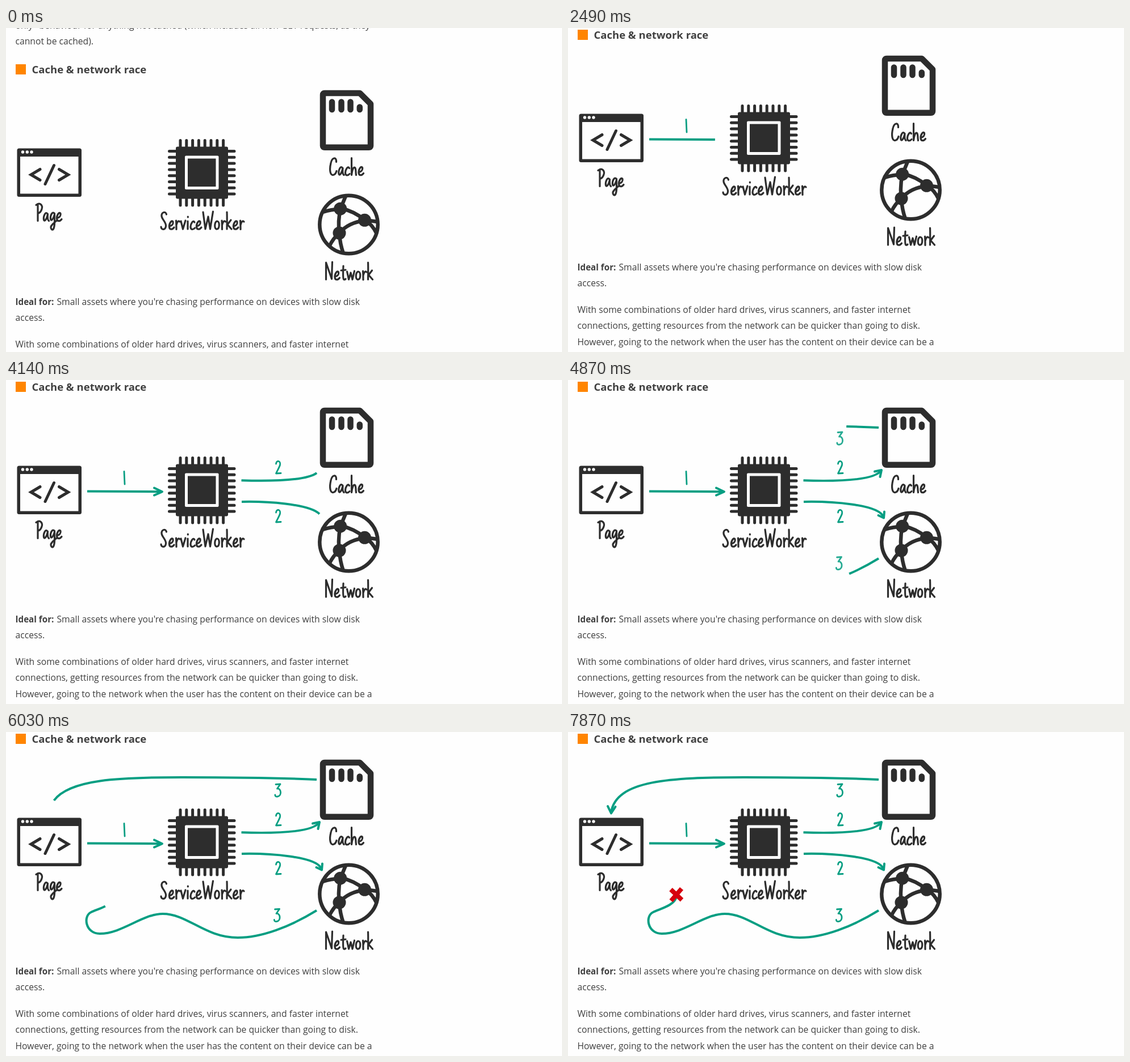
An HTML page for the animation above (8770 ms loop, 979 by 572 pixels).

```html
<!DOCTYPE html>
<html lang="en">
<head>
<meta charset="utf-8">
<title>Cache &amp; network race</title>
<style>
  html, body { margin: 0; width: 100%; height: 100%; overflow: hidden; background: #fefefe; }
  svg { display: block; width: 100%; height: 100%; }
  text { font: 15.7px "Open Sans", "Noto Sans", sans-serif; fill: #404040; }
  .bold { font-weight: 700; font-size: 15.2px; }
  .title { font-weight: 700; font-size: 18.5px; }
  .dark { fill: #2d2d2d; }
  .white { fill: #fefefe; }
  .line { fill: none; stroke: #2d2d2d; }
  .ink { fill: none; stroke: #2d2d2d; stroke-width: 3.2; stroke-linecap: round; stroke-linejoin: round; }
  .arrow { fill: none; stroke: #059e82; stroke-width: 4; }
  .head { stroke-linecap: round; stroke-linejoin: round; }
  .digit { stroke: #059e82; stroke-width: 2.8; }
</style>
</head>
<body>
<svg viewBox="0 0 979 572">
  <g id="page">
    <text x="16.5" y="-60">only" behaviour for anything not cached (which includes all non-GET requests, as they</text>
    <text x="16.5" y="-32">cannot be cached).</text>
    <rect x="17" y="3" width="18" height="18" fill="#ff8500"/>
    <text class="title" x="45.5" y="19">Cache &amp; network race</text>
    <text class="bold" x="16.5" y="428">Ideal for:</text>
    <text x="89.5" y="428">Small assets where you're chasing performance on devices with slow disk</text>
    <text x="16.5" y="456">access.</text>
    <text x="16.5" y="503">With some combinations of older hard drives, virus scanners, and faster internet</text>
    <text x="16.5" y="531">connections, getting resources from the network can be quicker than going to disk.</text>
    <text x="16.5" y="560">However, going to the network when the user has the content on their device can be a</text>

    <!-- browser window -->
    <rect class="dark" x="19.5" y="151.5" width="113.5" height="85.5" rx="3.5"/>
    <rect class="white" x="25" y="166" width="102.5" height="65.5"/>
    <g class="white">
      <circle cx="29.5" cy="158" r="2.7"/><circle cx="37.3" cy="158" r="2.7"/><circle cx="45" cy="158" r="2.7"/>
    </g>
    <path class="line" stroke-width="5" stroke-linecap="round" d="M60 188.5L44 198L60 207.5M84.5 181.5L69 214.5M93.5 188.5L109.5 198L93.5 207.5"/>

    <!-- chip -->
    <path id="pins" class="line" stroke-width="5" stroke-linecap="round"/>
    <rect class="dark" x="299" y="148.5" width="92" height="92" rx="3"/>
    <rect class="white" x="315" y="164.5" width="59.5" height="59.5" rx="2"/>
    <rect class="dark" x="320" y="169.5" width="49.5" height="49.5"/>

    <!-- memory card -->
    <path class="line" stroke-width="10.5" stroke-linejoin="round" d="M561 54H623L642 73V147Q642 149.700 639 149.700H561Q558 149.700 558 147V57Q558 54 561 54Z"/>
    <path class="line" stroke-width="10.5" stroke-linecap="round" d="M574 69.5V83M590.5 69.5V83M606.5 69.5V83M622.8 78.5V83"/>

    <!-- globe -->
    <circle class="line" cx="603.5" cy="286" r="51.2" stroke-width="6.5"/>
    <path class="line" stroke-width="6.5" d="M589 258L598 236M558 264Q572 259 589 259M589 257Q612 262 632 278M589 258Q584 280 587 301M587 301Q603 282 632 279M632 278L654 281M632 278Q645 286 652 301M587 301Q576 310 569 325M587 301Q588 320 594 337"/>
    <g class="dark">
      <circle cx="588.7" cy="258.2" r="11.5"/><circle cx="631.5" cy="278.3" r="11.5"/><circle cx="587" cy="301" r="11.5"/>
    </g>

    <g id="labels"></g>
    <g id="arrows"></g>
    <path id="cross" stroke="#d6000d" stroke-width="8" d="M181 278L200.5 296.5M200 276.5L181.5 298"/>
  </g>
  <path id="cursor" fill="#fff" stroke="#222" stroke-width="1.1" d="M.5 .5V16L4 12.7L6.5 18.3L9 17.3L6.6 11.8H11.3Z"/>
</svg>
<script>
const LOOP = 8770;
const byId = id => document.getElementById(id);
const clamp = p => Math.min(1, Math.max(0, p));
const ease = p => p * p * (3 - 2 * p);
const progress = (t, start, end) => ease(clamp((t - start) / (end - start)));

function addPath(parent, className, d, transform = '') {
  const path = document.createElementNS('http://www.w3.org/2000/svg', 'path');
  path.setAttribute('class', className);
  path.setAttribute('d', d);
  if (transform) path.setAttribute('transform', transform);
  parent.appendChild(path);
  return path;
}

let pins = '';
for (let i = 0; i < 8; i++) {
  pins += `M${307 + i * 10.8} 137.5V252M287.5 ${156.5 + i * 10.8}H402`;
}
byId('pins').setAttribute('d', pins);

// Hand lettering: advance width and pen strokes, baseline at y = 0.
const glyphs = {
  a: [12, 'M9 -13C5 -19 1 -9 2 -3C3 1 7 -3 9 -13C8.5 -7 9 -2 11 -1'],
  c: [10.5, 'M8.5 -13C6 -18 1.5 -10 1.5 -5C1.5 0 5.5 1 9 -3'],
  e: [11.5, 'M2 -6C6 -7 9 -10 8 -14C6 -18 1 -11 1.5 -5C2 1 7 0 10 -4'],
  g: [11.5, 'M9 -14C5 -19 1 -10 2 -4C3 0 7 -4 9 -13C9 -2 10 11 6 14.5C3 15 1 10 4 7C6 4 10 1 12 -1'],
  h: [13, 'M2 -31C2 -20 2 -10 2 -1C3 -9 5 -16 8 -14C10 -12 9 -5 10 -1'],
  i: [6, 'M2.5 -15V-1M2.8 -22V-22.8'],
  k: [12, 'M2 -31C2.5 -20 2 -10 2 -1M9 -17L3 -9L10 -1'],
  o: [11.5, 'M5 -15C0 -13 0 0 5 -1C10 -2 10 -15 5 -15Z'],
  r: [9, 'M2 -16C2.5 -10 2.5 -5 2.5 -.5M2.5 -8C3.5 -13 6 -17 8.5 -14'],
  t: [10, 'M5 -25C4.5 -15 4 -4 5.5 -1.5C7 0 8 -1 9 -2M1 -17L9 -18'],
  v: [11, 'M1.5 -15L5 -1L9.5 -16'],
  w: [16, 'M1.5 -15L4.5 -1L8 -13L11 -1L14.5 -16'],
  C: [15, 'M12.5 -24C13 -34 5 -32 3 -22C0 -10 2 0 7 -1C10 -1.5 12 -4 13 -8'],
  N: [17, 'M3 -1V-31L13 -2L14 -32'],
  P: [12.5, 'M4 -31C4 -20 4 -10 4 -1M1 -29C8 -35 13 -28 11 -22C10 -18 7 -15 4 -14'],
  S: [14.5, 'M11 -27C9 -34 2 -30 2.5 -24C3 -18 11 -13 10 -6C9 1 2 1 1.5 -5'],
  W: [21, 'M1.5 -31L5.5 -1L10.5 -23L14 -1L19 -32']
};

function letter(word, x, y) {
  for (const char of word) {
    const [advance, strokes] = glyphs[char];
    addPath(byId('labels'), 'ink', strokes, `translate(${x} ${y})`);
    x += advance;
  }
}
letter('Page', 52, 280.5);
letter('ServiceWorker', 271.5, 295);
letter('Cache', 569, 199.5);
letter('Network', 560.5, 384);

const one = 'M208 161.5L209 184';
const two = 'M475.5 148C476 141 484 142 482.5 150C481 155 477 161 475.5 165L484 164.5';
const three = 'M475 92.5L483 92L477.5 100C485 99 486 113 478 114C475 114.5 474 113 473.8 111';

// Each arrow: line path, head path, digit path, digit offset, line start and end, head end.
const arrows = [
  ['M143 196.5L274 197.2', 'M261 190.5L275 197.2L261 203.5', one, '', 1935, 2640, 2860],
  ['M414.5 177.3C470 179 540 178 551.5 159.5', 'M540 161.5L552 159L549.5 171', two, '', 3540, 4230, 4440],
  ['M415 215C460 214 548 219 555.5 242', 'M546.5 239L556 243.5L557 232.5', two, 'translate(0 86)', 3540, 4230, 4440],
  ['M547 84C460 80 380 80 310 80C180 80 84 85 76 142', 'M70 131L76 143.5L83.5 132', three, '', 4500, 6260, 6730],
  ['M547 315C500 344 450 363 408 363C350 363 320 321 276 321C240 321 205 356 165 356C140 356 135 325 150 318C165 311 187 306 191 291', '', three, 'translate(-1.5 220.5)', 4500, 6260, 6730]
].map(([line, head, digit, offset, start, lineEnd, headEnd]) => {
  const parent = byId('arrows');
  const arrow = {
    line: addPath(parent, 'arrow', line),
    head: addPath(parent, 'arrow head', head),
    digit: addPath(parent, 'ink digit', digit, offset),
    start, lineEnd, headEnd
  };
  arrow.line.setAttribute('pathLength', 1);
  return arrow;
});

function drawCursor(t) {
  const cursor = byId('cursor');
  cursor.style.display = t >= 7130 && t < 7870 ? '' : 'none';
  const enter = clamp((t - 7130) / 180);
  const leave = progress(t, 7310, 7870);
  const x = 35 + 722 * enter + 195 * leave;
  const y = 22 + 115 * enter + 435 * leave;
  cursor.setAttribute('transform', `translate(${x} ${y})`);
}

function draw(now) {
  const t = now % LOOP;
  byId('page').setAttribute('transform', `translate(0 ${t < 1090 ? 61 : 0})`);
  // The first arrow stalls briefly while it is being drawn.
  const drawTime = t > 2180 && t < 2490 ? 2180 : t;
  for (const { line, head, digit, start, lineEnd, headEnd } of arrows) {
    const drawn = progress(drawTime, start, lineEnd);
    line.style.display = drawn ? '' : 'none';
    line.setAttribute('stroke-dasharray', drawn < 1 ? `${drawn} 2` : 'none');
    head.style.opacity = progress(drawTime, lineEnd, headEnd);
    digit.style.opacity = progress(drawTime, start + 25, start + 475);
  }
  byId('cross').style.opacity = progress(t, 6310, 6730);
  drawCursor(t);
  requestAnimationFrame(draw);
}
draw(0);
</script>
</body>
</html>
```
